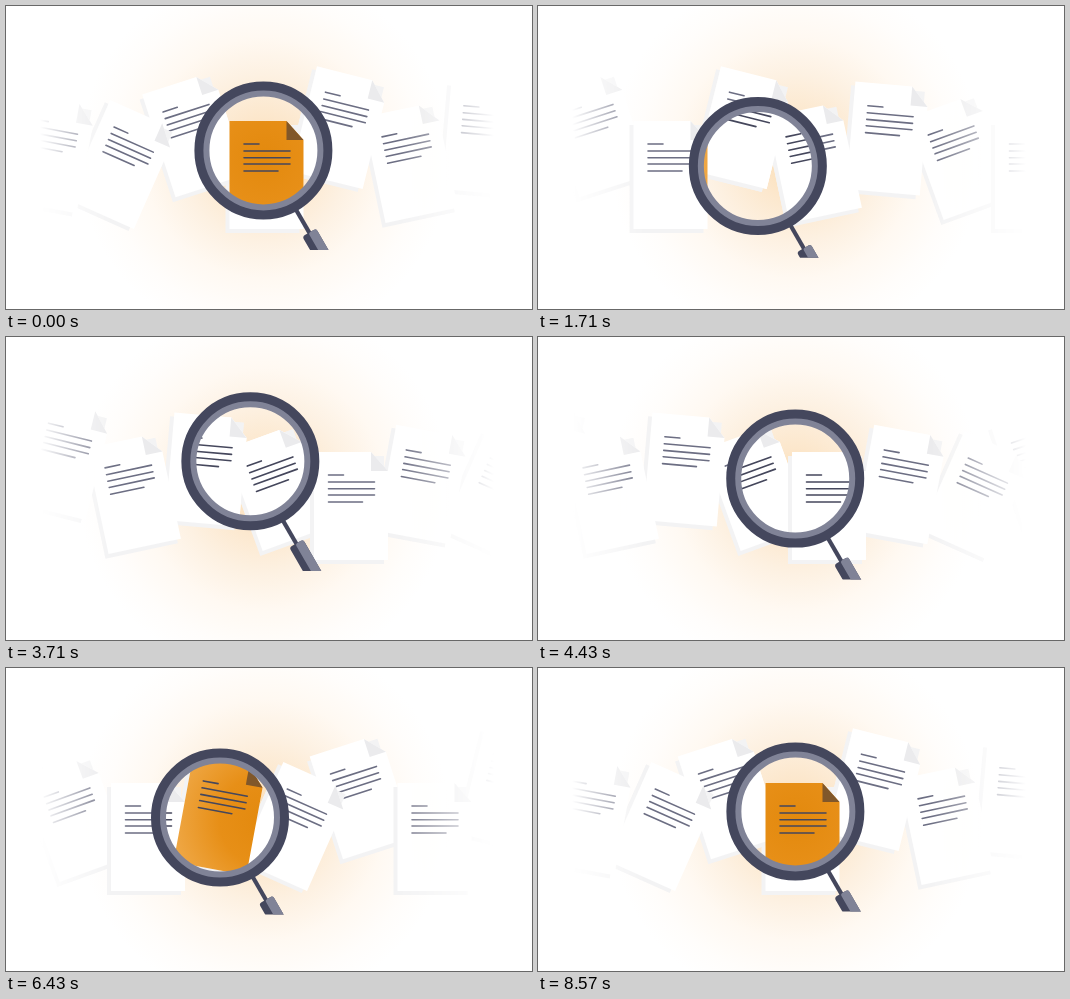
Write an HTML page that moves like this. It is 526x303 px and loops after 8.64 s.

```html
<!DOCTYPE html>
<html lang="en">
<head>
<meta charset="utf-8">
<title>Document search</title>
<style>
  html, body { margin: 0; width: 100%; height: 100%; overflow: hidden; background: #fff; }
  svg { display: block; width: 100vw; height: 100vh; }
  .lines { fill: none; stroke: #6c6e83; stroke-width: 1.6; stroke-linecap: round; }
  .page { fill: #fff; }
  .fold { fill: #ebebed; }
  .shadow { fill: #f3f3f4; }
  .glass .lines { stroke: #45475c; }
  #hotDetails .page, #hotDetails .shadow { display: none; }
  #hotDetails .fold { fill: #80572a; }
</style>
</head>
<body>
<svg viewBox="0 0 526 303">
  <defs>
    <radialGradient id="glow" gradientUnits="userSpaceOnUse" cx="258" cy="152" r="186">
      <stop offset="0" stop-color="#fbdcb0"/>
      <stop offset=".22" stop-color="#fce7cc"/>
      <stop offset=".45" stop-color="#fdf1e2"/>
      <stop offset=".65" stop-color="#fff9f2"/>
      <stop offset=".85" stop-color="#fffdfb"/>
      <stop offset="1" stop-color="#fff"/>
    </radialGradient>
    <radialGradient id="orange" gradientUnits="userSpaceOnUse" cx="258" cy="152" r="100">
      <stop offset="0" stop-color="#e3890d"/>
      <stop offset=".45" stop-color="#e78f17"/>
      <stop offset="1" stop-color="#f0ab4c"/>
    </radialGradient>
    <linearGradient id="edges" gradientUnits="userSpaceOnUse" x1="34" x2="488" y1="0" y2="0">
      <stop offset="0" stop-color="#000"/>
      <stop offset=".16" stop-color="#fff"/>
      <stop offset=".79" stop-color="#fff"/>
      <stop offset="1" stop-color="#000"/>
    </linearGradient>
    <mask id="fade" maskUnits="userSpaceOnUse" x="0" y="0" width="526" height="303">
      <rect width="526" height="303" fill="url(#edges)"/>
    </mask>
    <clipPath id="glassClip"><circle id="glassHole" r="55"/></clipPath>
    <clipPath id="handleClip"><rect id="handleLimit" width="526"/></clipPath>
    <clipPath id="hotClip" class="strip"></clipPath>
  </defs>

  <rect width="526" height="303" fill="url(#glow)"/>
  <g mask="url(#fade)"><g class="strip" id="outside"></g></g>
  <g class="glass" clip-path="url(#glassClip)">
    <g class="strip" id="inside"></g>
    <rect width="526" height="303" fill="url(#orange)" clip-path="url(#hotClip)"/>
    <g class="strip" id="hotDetails"></g>
  </g>

  <g clip-path="url(#handleClip)">
    <g class="lens">
      <g transform="translate(-.8 -.6) rotate(-30)">
        <path d="M-1 66V98" stroke="#44475d" stroke-width="4.2"/>
        <rect x="-9" y="95" width="16" height="50" rx="3" fill="#44475d"/>
        <rect x="-2" y="95" width="9" height="50" rx="2.5" fill="#808397"/>
      </g>
    </g>
  </g>
  <g class="lens" fill="none">
    <circle r="57.5" stroke="#808397" stroke-width="7"/>
    <circle r="64.5" stroke="#44475d" stroke-width="9"/>
  </g>
</svg>

<script>
const LOOP = 8640, FPS = 14, LAST_STEP = 120;
const SPACING = 72, FIRST_X = 261;
const PAGE_SHAPE = 'M-37-54H20L37-35V54H-37Z';

// Nine pages repeat along the strip; hot pages turn orange under the glass.
const pages = [
  { angle: 0, y: 169, dx: -0.5, hot: true },
  { angle: 14, y: 121.7, dx: 0.8 },
  { angle: -12, y: 156.5, dx: -0.5 },
  { angle: 5, y: 132.6, dx: 0.6 },
  { angle: -20, y: 150.5, dx: 1 },
  { angle: 0, y: 169, dx: 1 },
  { angle: 10.5, y: 147.5, dx: 0.8, hot: true },
  { angle: 24, y: 158.5, dx: 4.2 },
  { angle: -18, y: 128.5, dx: -1.5 }
];

// step, strip offset in px, lens angle on its circle in degrees
const keys = [
  [0, 0, 0], [24, 128, 135], [52, 277, 294], [72, 385, 411.5],
  [90, 480, 526.6], [104, 554, 614], [120, 644, 717.4]
];

const row = [];
for (let k = 13; k >= -4; k--) {
  const page = pages[(k + 9) % 9];
  row.push({ ...page, x: FIRST_X + SPACING * k + (k < 0 ? -1 : page.dx) });
}
// Upright pages lie on top of their neighbours.
row.sort((a, b) => (a.angle === 0) - (b.angle === 0));
const hotPages = row.filter(page => page.hot);

const byId = id => document.getElementById(id);
const placement = ({ x, y, angle }) => `translate(${x} ${y}) rotate(${angle})`;

const pageMarkup = page => `
  <g transform="${placement(page)}">
    <path class="shadow" d="M-41-50H33V58H-41Z"/>
    <path class="page" d="${PAGE_SHAPE}"/>
    <path class="fold" d="M20-54L37-35H20Z"/>
    <path class="lines" d="M-22.5-31H-7.5M-22.5-24H23.5M-22.5-17.3H23.5M-22.5-11H23.5M-22.5-4H11.5"/>
  </g>`;
const outline = page => `<path transform="${placement(page)}" d="${PAGE_SHAPE}"/>`;

byId('outside').innerHTML = row.map(pageMarkup).join('');
byId('inside').innerHTML = row.filter(page => !page.hot).map(pageMarkup).join('');
byId('hotClip').innerHTML = hotPages.map(outline).join('');
byId('hotDetails').innerHTML = hotPages.map(pageMarkup).join('');

const strips = document.querySelectorAll('.strip');
const lenses = document.querySelectorAll('.lens');

function poseAt(step) {
  const i = Math.max(1, keys.findIndex(key => key[0] >= step));
  const from = keys[i - 1], to = keys[i];
  const u = (step - from[0]) / (to[0] - from[0]);
  return [1, 2].map(c => from[c] + (to[c] - from[c]) * u);
}

function draw(ms) {
  const step = Math.min(LAST_STEP, Math.floor((ms % LOOP + 5) * FPS / 1000));
  const [offset, degrees] = poseAt(step);
  const angle = degrees * Math.PI / 180;
  const x = 235.4 + 22 * Math.cos(angle);
  const y = 144.4 + 22 * Math.sin(angle);
  const place = `translate(${x} ${y})`;

  strips.forEach(strip => strip.setAttribute('transform', `translate(${-offset} 0)`));
  lenses.forEach(lens => lens.setAttribute('transform', place));
  byId('glassHole').setAttribute('transform', place);
  byId('handleLimit').setAttribute('height', 171.8 + y / 2);
}

const start = performance.now();
function tick() {
  draw(performance.now() - start);
  requestAnimationFrame(tick);
}
tick();
</script>
</body>
</html>
```
